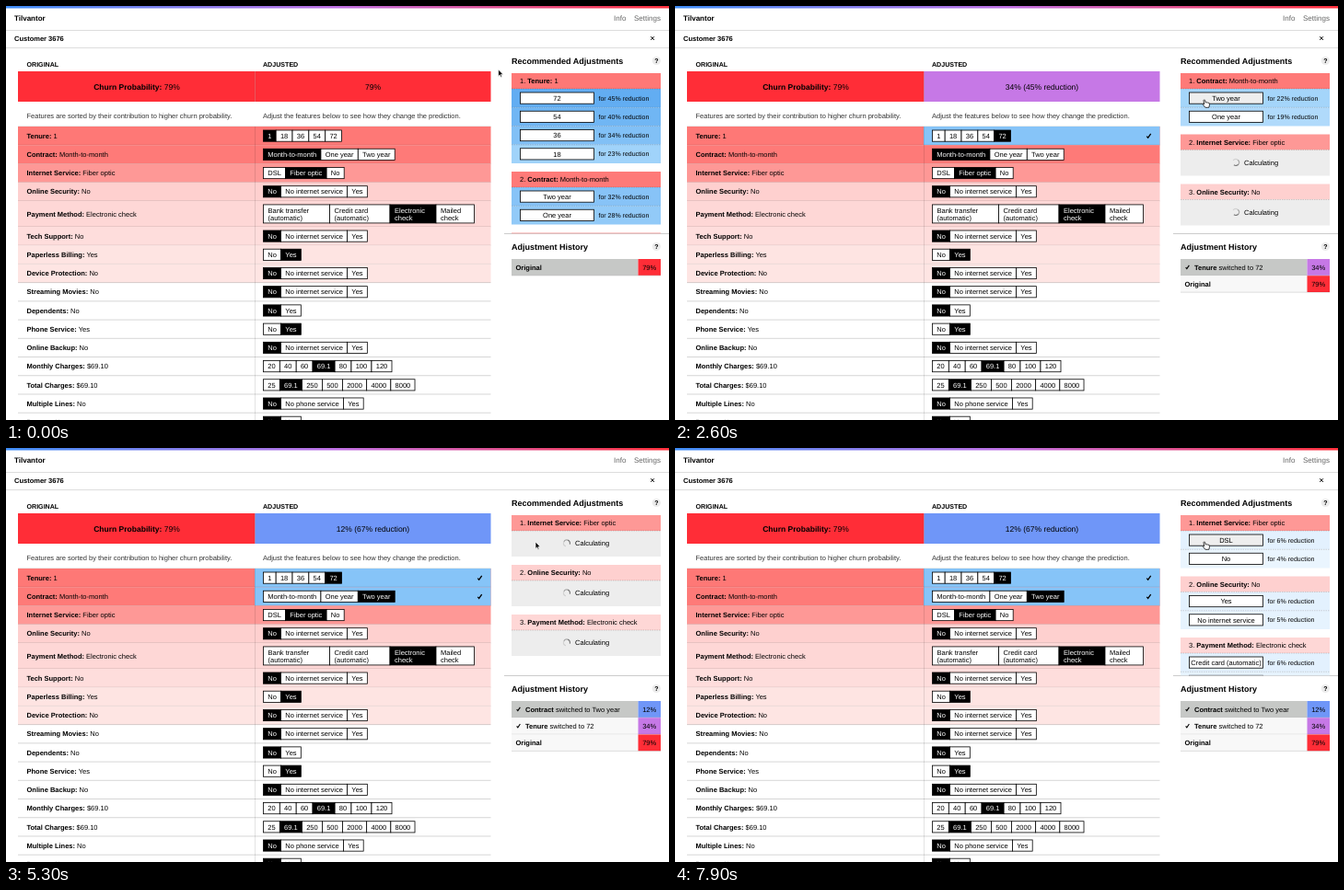
These frames come from a looping animation (720 by 450 pixels, 8 s). An HTML page:

```html
<!DOCTYPE html>
<html lang="en">
<head>
<meta charset="utf-8">
<title>Churn adjustments</title>
<style>
  html, body { margin: 0; width: 720px; height: 450px; overflow: hidden; background: #fff; }
  svg { display: block; }
  text { font-family: "Liberation Sans", Arial, sans-serif; text-rendering: geometricPrecision; white-space: pre; }
  .b { font-weight: 700; }
</style>
</head>
<body>
<svg width="720" height="450" viewBox="0 0 720 450">
  <defs>
    <linearGradient id="bar">
      <stop offset="0" stop-color="#3f8ef7"/>
      <stop offset=".5" stop-color="#c070e4"/>
      <stop offset="1" stop-color="#ff303c"/>
    </linearGradient>
    <clipPath id="panel"><path d="M540 70H720V247.2H540Z"/></clipPath>
  </defs>
  <g id="base"></g>
  <g id="live"></g>
  <g id="cursor">
    <path id="arrow" d="M0 0V7.4L1.7 5.9 2.8 8.5 4 8 2.9 5.4H5.2Z" fill="#000" stroke="#fff" stroke-width=".7"/>
    <path id="hand" d="M-1 .6C-.6-.3.5-.2.7.7L1.3 3C1.8 2.5 2.5 2.6 2.7 3.1 3.2 2.7 3.9 2.8 4.1 3.4 4.7 3.1 5.3 3.5 5.4 4.2L5.5 5.6 4.8 8.3H.9L-1.6 5.4C-2.2 4.5-1.4 3.9-.7 4.5L-.2 4.9Z" fill="#fff" stroke="#000" stroke-width=".75"/>
  </g>
</svg>
<script>
const LOOP = 8000, STEP = 100;
const RED = '#ff2d37', PURPLE = '#c678e6', BLUE = '#6f96f8';
const TINT = { tenure: '#fe7876', contract: '#fe7a78', internet: '#fe9896', security: '#fed0cf', payment: '#fed7d6' };
const $ = id => document.getElementById(id);

const rect = (x, y, w, h, fill, extra = '') =>
  `<rect x="${x}" y="${y}" width="${w}" height="${h}" fill="${fill}" ${extra}/>`;
const line = (x1, y1, x2, y2, color, extra = '') =>
  `<path d="M${x1} ${y1}L${x2} ${y2}" stroke="${color}" fill="none" ${extra}/>`;
// Text is centred vertically on y.
const text = (x, y, str, { size = 7.5, bold, fill = '#000', anchor = 'start' } = {}) =>
  `<text x="${x}" y="${y + size * .36}" font-size="${size}" fill="${fill}" text-anchor="${anchor}"${bold ? ' class="b"' : ''}>${str}</text>`;
const label = (name, value) => `<tspan class="b">${name}:</tspan> ${value}`;
const tick = (x, y, s = 1) =>
  `<path transform="translate(${x} ${y}) scale(${s})" d="M-2.2.5L-.8 2.1 2.2-2.3" fill="none" stroke="#000" stroke-width="1.3"/>`;

const pen = document.createElement('canvas').getContext('2d');
const widthOf = str => {
  pen.font = '75px "Liberation Sans", Arial, sans-serif';
  return pen.measureText(str).width / 10;
};

// Feature rows: name, value, options, selected index, tint
const NO_NET = ['No', 'No internet service', 'Yes'], YES_NO = ['No', 'Yes'];
const rows = [
  ['Tenure', '1', ['1', '18', '36', '54', '72'], 0, TINT.tenure],
  ['Contract', 'Month-to-month', ['Month-to-month', 'One year', 'Two year'], 0, TINT.contract],
  ['Internet Service', 'Fiber optic', ['DSL', 'Fiber optic', 'No'], 1, TINT.internet],
  ['Online Security', 'No', NO_NET, 0, TINT.security],
  ['Payment Method', 'Electronic check', null, 2, TINT.payment],
  ['Tech Support', 'No', NO_NET, 0, '#fedddc'],
  ['Paperless Billing', 'Yes', YES_NO, 1, '#fee4e2'],
  ['Device Protection', 'No', NO_NET, 0, '#fee5e3'],
  ['Streaming Movies', 'No', NO_NET, 0],
  ['Dependents', 'No', YES_NO, 0],
  ['Phone Service', 'Yes', YES_NO, 1],
  ['Online Backup', 'No', NO_NET, 0],
  ['Monthly Charges', '$69.10', ['20', '40', '60', '69.1', '80', '100', '120'], 3],
  ['Total Charges', '$69.10', ['25', '69.1', '250', '500', '2000', '4000', '8000'], 1],
  ['Multiple Lines', 'No', ['No', 'No phone service', 'Yes'], 0],
  ['Partner', 'No', YES_NO, 0]
];
const payOptions = [
  ['Bank transfer', '(automatic)', 72], ['Credit card', '(automatic)', 65.5],
  ['Electronic', 'check', 50], ['Mailed', 'check', 41.5]
];

const box = (x, y, w, h, on) =>
  rect(x, y, w, h, on ? '#000' : '#fff', 'stroke="#000" stroke-width=".8"');

function chips(y, options, selected) {
  let x = 279.5, out = '';
  options.forEach((name, i) => {
    const w = widthOf(name) + 9.5, on = i === selected;
    out += box(x, y - 6.1, w, 12.2, on) + text(x + w / 2, y, name, { fill: on ? '#fff' : '#000', anchor: 'middle' });
    x += w;
  });
  return out;
}

function payChips(y, selected) {
  let x = 279.5, out = '';
  payOptions.forEach(([a, b, w], i) => {
    const on = i === selected, fill = on ? '#fff' : '#000';
    out += box(x, y - 10, w, 20, on) + text(x + 5, y - 3.7, a, { fill }) + text(x + 5, y + 4, b, { fill });
    x += w;
  });
  return out;
}

function table(picks) {
  let y = 131, out = '';
  rows.forEach(([name, value, options, selected, tint], i) => {
    const h = options ? 20.22 : 28.1, mid = y + h / 2, pick = picks[i];
    if (tint) out += rect(13, y, 513.5, h, tint);
    if (pick !== undefined) out += rect(270, y, 256.5, h, '#86c4f8') + tick(514.5, mid);
    out += line(13, y + h, 526.5, y + h, 'rgba(0,0,0,.24)', 'stroke-width=".7"');
    out += text(22.5, mid, label(name, value));
    out += options ? chips(mid, options, pick ?? selected) : payChips(mid, selected);
    y += h;
  });
  return out + line(270.5, 131, 270.5, 450, 'rgba(0,0,0,.16)', 'stroke-width=".7"');
}

// Bluer for a larger reduction.
function blueFor(p) {
  const mix = (a, b, k) => a.map((v, i) => Math.round(v + (b[i] - v) * k));
  const pale = [250, 252, 255], mid = [160, 211, 250], deep = [98, 173, 242];
  return `rgb(${p < 23 ? mix(pale, mid, p / 23) : mix(mid, deep, (p - 23) / 22)})`;
}

// Each recommendation: name, value, tint, choices, time it is ready
const yesNet = [['Yes', 6], ['No internet service', 5]];
const phases = [
  { at: 0, picks: [], result: '79%', color: RED, recs: [
    ['Tenure', '1', TINT.tenure, [['72', 45], ['54', 40], ['36', 34], ['18', 23]], 0],
    ['Contract', 'Month-to-month', TINT.contract, [['Two year', 32], ['One year', 28]], 0],
    ['Internet Service', 'Fiber optic', TINT.internet, [['DSL', 12]], 0]
  ] },
  { at: 1500, picks: [4], result: '34% (45% reduction)', color: PURPLE, recs: [
    ['Contract', 'Month-to-month', TINT.contract, [['Two year', 22], ['One year', 19]], 2600],
    ['Internet Service', 'Fiber optic', TINT.internet, [['DSL', 12], ['No', 6]], 3100],
    ['Online Security', 'No', TINT.security, yesNet, 3900]
  ] },
  { at: 4800, picks: [4, 2], result: '12% (67% reduction)', color: BLUE, recs: [
    ['Internet Service', 'Fiber optic', TINT.internet, [['DSL', 6], ['No', 4]], 6900],
    ['Online Security', 'No', TINT.security, yesNet, 6100],
    ['Payment Method', 'Electronic check', TINT.payment, [['Credit card (automatic)', 6], ['Bank transfer (automatic)', 5]], 7200]
  ] }
];
const log = [
  ['<tspan class="b">Original</tspan>', '79%', RED],
  ['<tspan class="b">Tenure</tspan> switched to 72', '34%', PURPLE],
  ['<tspan class="b">Contract</tspan> switched to Two year', '12%', BLUE]
];

const dashed = y => line(549, y, 711, y, 'rgba(0,0,0,.28)', 'stroke-width=".6" stroke-dasharray="1.5 1"');
const spinner = (x, y) => `<g transform="translate(${x} ${y})"><g class="spin" fill="none" stroke-width="1.2">
  <path d="M0-3.5A3.5 3.5 0 0 0-3.5 0" stroke="#777"/>
  <path d="M-3.5 0A3.5 3.5 0 0 0 0 3.5" stroke="#aaa"/>
  <path d="M0 3.5A3.5 3.5 0 0 0 3.5 0" stroke="#d2d2d2"/></g></g>`;

function recommendations(recs, t, hover) {
  let y = 73, out = '';
  recs.forEach(([name, value, tint, choices, ready], i) => {
    out += rect(549, y, 162, 17, tint) + text(558, y + 8.5, `${i + 1}. ` + label(name, value));
    y += 17;
    if (t < ready) {
      out += rect(549, y, 162, 28, '#ededed') + spinner(609, y + 13.5) + text(618, y + 13.5, 'Calculating');
      out += dashed(y);
      y += 28;
    } else choices.forEach(([choice, cut], j) => {
      const mid = y + 10.1, over = hover && !i && !j;
      out += rect(549, y, 162, 20.25, blueFor(cut)) + dashed(y);
      out += rect(558.5, mid - 6.1, 80, 12.2, over ? '#eee' : '#fff', 'stroke="#000" stroke-width=".8"');
      out += text(598.5, mid, choice, { anchor: 'middle' }) + text(643.5, mid, `for ${cut}% reduction`, { size: 7 });
      y += 20.25;
    });
    y += 9;
  });
  return `<g clip-path="url(#panel)">${out}</g>`;
}

function history(count) {
  return log.slice(0, count + 1).reverse().map(([entry, pct, color], i) => {
    const y = 275 + i * 18.2, mid = y + 8.8, original = i === count;
    return rect(549, y, 137.5, 17.8, i ? '#f8f8f8' : '#c6c8c6') + rect(686.5, y, 24.5, 17.8, color) +
      line(549, y + 18, 711, y + 18, 'rgba(0,0,0,.22)', 'stroke-width=".6"') +
      (original ? '' : tick(556.5, mid, .85)) +
      text(original ? 553.5 : 564, mid, entry) + text(698.7, mid, pct, { anchor: 'middle' });
  }).join('');
}

const help = y => `<circle cx="706.3" cy="${y}" r="4.6" fill="#ececec"/>` +
  text(706.3, y, '?', { size: 7, bold: true, anchor: 'middle' });

$('base').innerHTML =
  rect(0, 0, 720, 2.5, 'url(#bar)') +
  text(9, 13.5, 'Tilvantor', { size: 8, bold: true }) +
  text(660, 13.5, 'Info', { size: 8, fill: '#666' }) + text(682, 13.5, 'Settings', { size: 8, fill: '#666' }) +
  line(0, 26.5, 720, 26.5, '#ddd') + line(0, 45.5, 720, 45.5, '#ddd') +
  text(9, 35.5, 'Customer 3676', { bold: true }) +
  line(700.3, 33.3, 703.9, 36.9, '#000') + line(703.9, 33.3, 700.3, 36.9, '#000') +
  text(22.5, 63, 'ORIGINAL', { size: 7.1, bold: true }) + text(279, 63, 'ADJUSTED', { size: 7.1, bold: true }) +
  rect(13, 71, 257.5, 33, RED) + text(142, 87.5, label('Churn Probability', '79%'), { size: 8.5, anchor: 'middle' }) +
  text(22.5, 119.5, 'Features are sorted by their contribution to higher churn probability.', { fill: '#333' }) +
  text(279, 119.5, 'Adjust the features below to see how they change the prediction.', { fill: '#333' }) +
  line(13, 131, 526.5, 131, '#ccc', 'stroke-width=".7"') +
  text(549, 59.5, 'Recommended Adjustments', { size: 9, bold: true }) + help(59.5) +
  line(541, 247.5, 720, 247.5, '#ccc') +
  text(549, 261.5, 'Adjustment History', { size: 9, bold: true }) + help(261.5);

function scene(phase, t, hover) {
  return rect(270.5, 71, 256, 33, phase.color) +
    line(270.5, 71, 270.5, 104, 'rgba(0,0,0,.14)', 'stroke-width=".7"') +
    text(398.5, 87.5, phase.result, { size: 8.5, anchor: 'middle' }) +
    table(phase.picks) + recommendations(phase.recs, t, hover) + history(phase.picks.length);
}

let shown = '';
function draw(now) {
  const t = Math.floor(now % LOOP / STEP) * STEP;
  const phase = phases.filter(p => t >= p.at).pop();

  const k = Math.min(1, Math.max(0, (t - 100) / 700)), ease = k * k * (3 - 2 * k);
  const x = 534.7 + 40.3 * ease, y = 69 + 33 * ease;
  const hover = t >= phase.recs[0][4] && x > 558 && y > 94;

  const key = [phase.at, hover, ...phase.recs.map(r => t >= r[4])].join();
  if (key !== shown) {
    $('live').innerHTML = scene(phase, t, hover);
    shown = key;
  }
  for (const s of document.querySelectorAll('.spin')) s.setAttribute('transform', `rotate(${t * .36 % 360})`);
  $('cursor').setAttribute('transform', `translate(${x} ${y})`);
  $('arrow').style.display = hover ? 'none' : '';
  $('hand').style.display = hover ? '' : 'none';
  requestAnimationFrame(draw);
}
draw(0);
</script>
</body>
</html>
```
